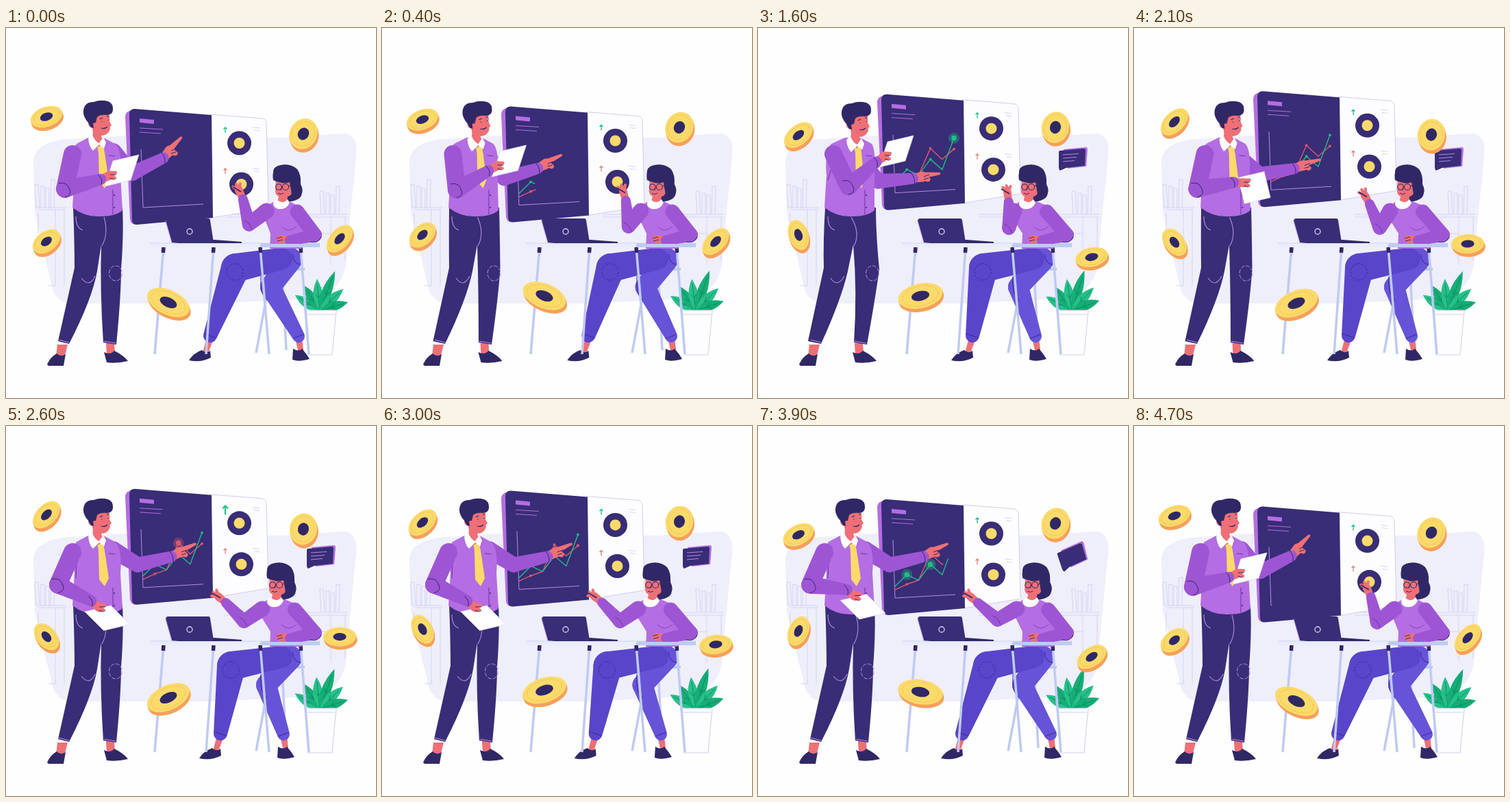
Write an HTML page with a canvas that moves like this. It is 540 px wide and 540 px high and loops after 4800 ms.

```html
<!DOCTYPE html>
<html lang="en">
<head>
<meta charset="utf-8">
<title>Market presentation</title>
<style>
  html, body { margin: 0; width: 100%; height: 100%; overflow: hidden; background: #fefdff; }
  canvas { display: block; width: 100vw; height: 100vh; }
</style>
</head>
<body>
<canvas id="stage" width="540" height="540"></canvas>
<script>
const ctx = document.getElementById('stage').getContext('2d');
const LOOP = 4800, STEP = 100, TAU = Math.PI * 2, DEG = Math.PI / 180;

const NAVY = '#382d76', HAIR = '#302866', VIOLET = '#b46de2', SLEEVE = '#9e55d4',
  SKIN = '#ee7076', RED = '#d9596f', GREEN = '#22bd82', YELLOW = '#fbda6a',
  ORANGE = '#f6a05a', WHITE = '#ffffff', PALE = '#d3d4f2', STEEL = '#bfcaf3',
  SEAM = '#b58ae8', FOLD = '#6b32a0', JEANS = '#5945c9', JEANS_FAR = '#6653d8';

// ---- timing ----
const clamp = v => Math.max(0, Math.min(1, v));
const ramp = (t, from, to) => clamp((t - from) / (to - from));
const ease = (t, from, to) => { const p = ramp(t, from, to); return p * p * (3 - 2 * p); };
const hold = (t, a, b, c, d) => ease(t, a, b) - ease(t, c, d);
const wave = (t, period, peak = 0) => Math.cos(TAU * (t - peak) / period);
const pulse = (t, at) => hold(t, at - 450, at, at, at + 450);

const mix = (a, b, p) => a + (b - a) * p;
const mixPoint = (a, b, p) => a.map((v, i) => mix(v, b[i], p));
const polar = ([x, y], angle, r) => [x + r * Math.cos(angle), y + r * Math.sin(angle)];

// ---- drawing helpers ----
function fill(color, d) {
  ctx.fillStyle = color;
  ctx.fill(new Path2D(d));
}

function line(color, width, d) {
  ctx.strokeStyle = color;
  ctx.lineWidth = width;
  ctx.stroke(new Path2D(d));
}

function dashed(pattern, draw) {
  ctx.setLineDash(pattern);
  draw();
  ctx.setLineDash([]);
}

function oval(color, x, y, rx, ry = rx, angle = 0) {
  ctx.beginPath();
  ctx.ellipse(x, y, rx, ry, angle, 0, TAU);
  ctx.fillStyle = color;
  ctx.fill();
}

function ring(color, width, x, y, rx, ry = rx, angle = 0) {
  ctx.beginPath();
  ctx.ellipse(x, y, rx, ry, angle, 0, TAU);
  ctx.strokeStyle = color;
  ctx.lineWidth = width;
  ctx.stroke();
}

// Rounded segment whose radius goes from r1 to r2.
function taper(color, [x1, y1], r1, [x2, y2], r2) {
  const a = Math.atan2(y2 - y1, x2 - x1);
  const b = Math.acos(Math.max(-1, Math.min(1, (r1 - r2) / Math.hypot(x2 - x1, y2 - y1))));
  ctx.beginPath();
  ctx.arc(x1, y1, r1, a + b, a - b + TAU);
  ctx.arc(x2, y2, r2, a - b, a + b);
  ctx.fillStyle = color;
  ctx.fill();
}

function limb(color, a, r1, b, r2, c, r3) {
  taper(color, a, r1, b, r2);
  taper(color, b, r2, c, r3);
}

// Middle joint of a two-bone limb.
function joint([x1, y1], [x2, y2], upper, lower, side) {
  const dx = x2 - x1, dy = y2 - y1, dist = Math.hypot(dx, dy);
  const along = (upper ** 2 - lower ** 2 + dist ** 2) / (2 * dist);
  const off = side * Math.sqrt(Math.max(0, upper ** 2 - along ** 2));
  return [x1 + (dx * along - dy * off) / dist, y1 + (dy * along + dx * off) / dist];
}

function group(x, y, angle, scale, draw) {
  ctx.save();
  ctx.translate(x, y);
  ctx.rotate(angle);
  ctx.scale(scale, scale);
  draw();
  ctx.restore();
}

function trace(color, width, points, progress) {
  if (progress <= 0) return;
  let length = 0;
  points.forEach(([x, y], i) => {
    if (i) length += Math.hypot(x - points[i - 1][0], y - points[i - 1][1]);
  });
  dashed([length * progress, length * 2], () => line(color, width, 'M' + points.join('L')));
}

// ---- room ----
function books(x, base) {
  for (let i = 0; i < 4; i++) {
    const h = 28 + (i * 13 + 6) % 16, lean = i % 3 ? 0 : i - 2;
    line(PALE, 1, `M${x + i * 7},${base}l${lean},${-h}h5l${-lean},${h}`);
  }
}

function room() {
  ctx.fillStyle = '#fefdff';
  ctx.fillRect(0, 0, 540, 540);
  fill('#efeefb', 'M40,195Q40,170 82,163L175,157L400,160L495,154Q514,158 511,185L497,330Q497,388 440,395L300,402L92,402Q70,398 66,372L42,270Z');
  line(PALE, 1, 'M44,262H88M47,265H88M72,265V376M85,265V376M62,376H72M47,270V300');
  line(PALE, 1, 'M322,272H498M322,276H498M495,276V340M474,276V345M445,300H474');
  books(44, 262);
  books(460, 272);
}

// ---- board ----
const SERIES = [ // beats belong to every second point
  { color: RED, heights: [250, 242, 236, 197, 213, 198], beats: [800, 2600, 3400] },
  { color: GREEN, heights: [245, 228, 236, 213, 228, 182], beats: [3900, 3900, 1600] }];

function chart(t) {
  const axis = t < 4550 ? 1 - ramp(t, 4300, 4500) : ramp(t, 4600, 4800);
  trace(SEAM, 1, [[197, 177], [200, 262], [288, 257]], axis);
  const shown = ramp(t, 250, 950) - ramp(t, 3800, 4400);
  for (const { color, heights, beats } of SERIES) {
    const points = heights.map((y, i) => [200 + 17.2 * i, y]);
    trace(color, 1.4, points, shown);
    beats.forEach((at, i) => {
      const [x, y] = points[2 * i + 1], beat = pulse(t, at);
      if (shown < (2 * i + 1) / 5 - .1) return;
      ctx.globalAlpha = .35;
      oval(color, x, y, 2 + 6 * beat);
      ctx.globalAlpha = 1;
      oval(color, x, y, 1.8 + 2 * beat);
    });
  }
}

function coinRow(x, y, arrowColor, beat) {
  group(320, y - 19, 0, 1 + .6 * beat, () => line(arrowColor, 1.3, 'M0,4V-4M-2.5,-1.5L0,-4L2.5,-1.5'));
  oval(NAVY, x, y, 17.5);
  oval(YELLOW, x, y, 8);
  line(PALE, 1, `M360,${y - 23}l10,1M362,${y - 19}l8,1`);
}

function board(t) {
  ctx.save();
  ctx.translate(0, -26.5 * Math.sin(Math.PI * t / LOOP) ** 1.5);
  fill(VIOLET, 'M188,118L180,121Q174,123 174,130L181,279Q182,287 190,287Z');
  const panel = 'M298,126L374,132Q380,133 380,140L383,261Q383,264 378,264L300,277';
  fill('#fdfcff', panel);
  line('#cfcdf0', 1, panel);
  fill(NAVY, 'M188,118L300,127L302,277L191,287Q184,287 184,280L180,126Q180,118 188,118Z');
  fill(VIOLET, 'M195,132L216,134V140L195,138Z');
  line(VIOLET, 1, 'M195,146L229,148M195,152L226,154');
  chart(t);
  coinRow(340.5, 168, GREEN, pulse(t, 2600));
  coinRow(343.5, 228, '#e08375', pulse(t, 3400));
  ctx.restore();
}

function bubble(t) {
  const size = hold(t, 500, 750, 3900, 4200);
  if (!size) return;
  group(458, 191, -.32 * ramp(t, 3550, 3900), size, () => {
    fill(VIOLET, 'M-12,-14L20,-17Q23,-17 23,-14L21,11L-6,14Z');
    fill(NAVY, 'M-17,-12L17,-15Q20,-15 20,-12L19,10L-8,13L-17,17Q-19,16 -19,12L-19,-10Q-19,-12 -17,-12Z');
    const words = ramp(t, 650, 1300) - ramp(t, 3500, 3800);
    for (let i = 0; i < 3; i++) {
      const y = 5 * i - 6, w = 23 - 3 * i;
      trace(SEAM, 1, [[-13, y], [w - 13, y - 1.5]], clamp(words * 3 - i));
    }
  });
}

// ---- coins ----
const COINS = [
  { x: 59, y: 147, rx: 24, ry: 14.5, rise: -16, tilt: -32, swing: 13 },
  { x: 434, y: 147, rx: 20, ry: 23, rise: 11, tilt: 20, swing: 10 },
  { x: 59, y: 304, rx: 14.5, ry: 22.5, rise: 11, tilt: 6, swing: 48 },
  { x: 237, y: 393, rx: 33, ry: 18, rise: 11, tilt: 0, swing: 25 },
  { x: 487, y: 325, rx: 24, ry: 14, rise: -16, tilt: -24, swing: -24 }];

function coin({ x, y, rx, ry, rise, tilt, swing }, t) {
  y += rise * wave(t, LOOP / 2, rise < 0 ? 100 : -200) - 2;
  const angle = (tilt + swing * wave(t, LOOP)) * DEG;
  for (let d = 5; d > 0; d--) oval(ORANGE, x + d * .35, y + d, rx, ry, angle);
  oval(YELLOW, x, y, rx, ry, angle);
  dashed([1.5, 1.5], () => ring('#e9b64e', 1, x, y, rx * .8, ry * .8, angle));
  oval(HAIR, x, y, rx * .4, ry * .4, angle);
}

// ---- plant ----
function plant(t) {
  const sway = -2 + 3 * wave(t, LOOP / 2, -100);
  for (let i = 0; i < 6; i++) {
    const deg = -58 + 26 * i, n = 43 + 19 * Math.max(0, wave(deg, 120, 20));
    group(458, 413, (deg + sway) * DEG, 1, () => {
      fill(i % 2 ? '#16ad76' : '#27c08a', `M0,0Q-15,${-n * .45} 0,${-n}Q13,${-n * .45} 0,0Z`);
      line('#0b8b61', .9, `M0,0V${-n * .85}M0,${-n * .4}l4,-6M0,${-n * .4}l-4,-6`);
    });
  }
  const pot = 'M436,412H482L476,477H441Z';
  fill('#fdfcff', pot);
  line(PALE, 1.2, pot + 'M438,418H480');
}

// ---- desk ----
function stool() {
  line(STEEL, 4, 'M384,352H436');
  line(STEEL, 3.5, 'M387,356L365,474M403,356L409,470');
}

function desk() {
  for (const [x, foot] of [[230, 217], [303, 292], [371, 384], [430, 442]]) {
    line(STEEL, 3.5, `M${x},320L${foot},476`);
    line(HAIR, 5.5, `M${x},320L${mix(x, foot, .05)},328`);
  }
  fill('#e9ecfc', 'M210,313H458V320H212Z');
  fill(STEEL, 'M372,314H458V320H370Z');
  line(PALE, 1, 'M210,314H458');
  fill(HAIR, 'M303,309L344,312V314H240Z');
  fill(NAVY, 'M237,278H295Q298,278 298,281L303,313H242L233,282Q233,278 237,278Z');
  line(SEAM, .8, 'M233,281L242,313');
  ring('#d9d2f5', 1.3, 268, 297, 4);
}

// ---- woman ----
function womanLegs(t) {
  const step = hold(t, 0, 1300, 2800, 3900);
  const a = 298 + 15 * step, b = 427 - 22 * step;
  const knee = [335 - 6 * step, 350], farKnee = [386 - 6 * step, 378];
  taper(SKIN, [a, 452], 5, [a - 6, 471], 4);
  taper(SKIN, [b, 452], 5, [b + 3, 470], 4);
  fill(HAIR, `M${a - 31},485Q${a - 24},474 ${a - 12},470Q${a - 6},476 ${a},471L${a + 1},481Q${a - 14},489 ${a - 31},485Z`);
  fill(HAIR, `M${b - 8},468Q${b},473 ${b + 5},468Q${b + 12},476 ${b + 16},483Q${b},488 ${b - 9},484Z`);
  limb(JEANS_FAR, [414, 338], 18, farKnee, 15, [b, 450], 9);
  limb(JEANS, [402, 337], 16, knee, 21, [a, 449], 10);
  dashed([3, 2], () => ring('#392b96', 1, knee[0] - 1, 356, 12));
  line('#392b96', 1, `M${a - 9},446L${a + 8},452M${b - 8},453L${b + 8},447M372,362Q370,390 381,397M418,330Q420,345 430,345`);
}

function womanHead() {
  fill(HAIR, 'M393,222Q384,203 401,200Q415,197 425,206Q431,214 430,228Q434,236 432,241Q431,249 421,252Q412,255 406,250L398,240Z');
  fill(SKIN, 'M394,222Q408,224 415,217L419,234Q417,246 411,246L410,256Q402,261 396,254L398,246Q392,243 393,236Z');
  fill(WHITE, 'M390,256Q391,251 396,251Q404,258 411,250L414,255Q409,266 397,264Q390,262 390,256Z');
  fill(HAIR, 'M390,222Q387,203 401,202Q417,202 419,222Q421,235 417,243L414,225Q406,229 390,222Z');
  ring(HAIR, 1.1, 398, 232, 4.3);
  ring(HAIR, 1.1, 408, 232, 4.5);
  line(HAIR, 1, 'M412,231L418,229M402,233L401,237M397,241Q401,244 405,241');
}

function womanBody(t) {
  const lean = -9 * hold(t, 0, 1000, 3400, 4300);
  const think = hold(t, 0, 800, 1600, 2600), explain = hold(t, 1600, 2600, 3900, 4700);
  const lift = pulse(t, 3400);

  fill(VIOLET, `M${390 + lean},254Q${376 + lean * .7},260 ${378 + lean * .5},280L386,300L385,322H432L434,295Q441,268 ${425 + lean * .4},259L${408 + lean},250Z`);
  line('#8846bd', 1, 'M402,290Q412,300 424,290');

  const rest = [414, 310 - 16 * lift];
  const [fx, fy] = rest;
  taper(SKIN, rest, 6, [fx - 14, fy - 2], 5.5);
  line(HAIR, 1, `M${fx - 19},${fy - 3}l8,-2M${fx - 18},${fy + 1}l8,-2`);
  limb(SLEEVE, [425 + lean * .4, 268], 10.5, [451, 302], 10, rest, 7);
  line(HAIR, 1, 'M444,312Q456,315 460,305');

  const hand = [340 + 24 * think - 30 * explain + 9 * lift, 237 + 3 * think + 12 * explain - 7 * lift];
  const aim = -2 + .3 * think - .45 * explain;
  const wrist = polar(hand, aim, -14), shoulder = [380 + lean * .7, 267];
  const elbow = joint(shoulder, wrist, 32 - 6 * think, 38, -1);
  taper(SKIN, wrist, 5, hand, 6);
  for (const spread of [-.6, 0, .6]) taper(SKIN, hand, 3, polar(hand, aim + spread, 10), 2);
  line(HAIR, 1.6, `M${hand[0] - 9},${hand[1] - 5}l12,7`);
  limb(SLEEVE, shoulder, 11.5, elbow, 10, wrist, 7);
  line(FOLD, 1, `M${elbow[0] - 7},${elbow[1] - 6}q9,4 11,13`);

  group(lean, 0, 0, 1, womanHead);
}

// ---- man ----
function manLegs(turn) {
  const by = (a, b) => mix(a, b, turn);
  fill(SKIN, 'M75,462L90,462L85,482L73,480Z');
  fill(HAIR, 'M60,491Q65,480 74,475Q79,481 87,476L84,493H62Z');
  group(-5 * turn, 0, 0, 1, () => {
    fill(SKIN, 'M146,460H158L159,476L147,478Z');
    fill(HAIR, 'M143,473Q152,478 158,471Q172,478 178,486Q162,490 147,488Z');
  });
  fill('#2b245f', `M138,300L${by(142, 150)},350L148,395L158,330Z`);
  fill(NAVY, `M98,262Q${by(100, 95)},310 ${by(100, 96)},350L${by(76, 73)},457L92,461` +
    `Q${by(126, 122)},395 ${by(133, 131)},355L139,316Q${by(137, 145)},385 ${by(142, 140)},459L${by(161, 159)},462` +
    `Q${by(168, 172)},390 ${by(168, 177)},352Q172,300 ${by(170, 172)},262Z`);
  line(SEAM, 1.1, `M77,455L92,459M${by(143, 140)},457L${by(160, 158)},460M102,275Q102,292 112,295` +
    `M${by(143, 136)},276Q150,300 140,318M${by(110, 106)},365Q${by(122, 116)},380 ${by(130, 126)},362`);
  dashed([6, 2], () => ring(SEAM, 1, by(160, 167), 358, 9.5, 11));
}

function manTorso(turn) {
  const up = 7 * turn;
  fill(VIOLET, `M${120 + up},160L${103 + up * .6},169Q${94 + up * .4},180 100,215L97,262Q115,276 137,275Q160,275 170,266L${167 + turn * 3},215` +
    `Q${170 + up * .3},178 ${159 + up},169L${144 + up},161Z`);
  line(FOLD, 1, `M${103 + up},196L102,222M${150 + up},186l9,1M156,236V272`);
  for (const y of [244, 262]) oval(HAIR, 158, y, 1);
  fill(YELLOW, `M${133 + up},172h9l2,10L${150 + up * .7},222L${144 + up},234L${136 + up},224L${135 + up},182Z`);
}

function manHead() {
  fill(SKIN, 'M125,140L150,130L152,148Q148,157 139,157L142,167L134,174L125,164L127,153Z');
  fill(WHITE, 'M120,161L126,156Q130,166 136,168L142,159L146,167L143,176L136,170L127,179Q121,173 120,161Z');
  fill(SKIN, 'M122,133Q130,132 135,127L150,123Q152,131 151,136L154,142L151,145Q151,155 142,156Q130,155 128,146Q120,146 120,139Z');
  fill(HAIR, 'M120,138Q112,129 113,121Q114,108 128,108Q138,104 149,107Q157,110 156,120Q155,127 147,127Q138,126 133,130L131,138L127,139L128,146L124,145Z');
  line(HAIR, 1.2, 'M137,133L141,131M147,129L150,129M140,136v1M149,134v1M139,146Q144,148 148,144M122,141Q125,139 126,143');
}

function pointingArm(turn, low) {
  const hand = [239 + turn + 15 * low, 179 + 38 * turn + 5 * low];
  const aim = -.85 + .67 * turn + .36 * low;
  const wrist = polar(hand, aim, -14), shoulder = [156 + 4 * turn, 181 + 27 * turn];
  const elbow = joint(shoulder, wrist, 42 - 20 * turn, 51, 1);
  const [hx, hy] = hand, [wx, wy] = wrist;
  taper(SKIN, wrist, 6, hand, 7.5);
  taper(SKIN, [hx, hy - 2], 4.5, polar(hand, aim, 25), 1.8);
  taper(SKIN, hand, 5, [hx + 8, hy + 4], 3.5);
  line(HAIR, 1, `M${hx + 2},${hy}l8,-3M${hx + 2},${hy + 4}l7,-2`);
  limb(SLEEVE, shoulder, 13, elbow, 11, wrist, 8);
  line(HAIR, 1, `M${wx - 3},${wy - 8}q7,8 5,16`);
}

function paperArm(turn, low, flat) {
  const hand = [152 + 33 * turn - 16 * low, 215 - 28 * turn + 50 * low];
  const [hx, hy] = hand;

  const corner = mixPoint([hx + 4, hy - 21], [hx - 21, hy + 6], flat);
  const side = polar([0, 0], mix(108, 45, flat) * DEG, 39);
  const paper = `M${corner}l38,-9l${side}l-38,9Z`;
  fill(WHITE, paper);
  line('#dcdaf4', .8, paper);

  const wrist = polar(hand, mix(-.4, .7, flat) - .2 * turn, -15), shoulder = [97 + 13 * turn, 184];
  const elbow = joint(shoulder, wrist, 52, 54, 1);
  const [ex, ey] = elbow, [wx, wy] = wrist;
  taper(SKIN, wrist, 6, hand, 6.5);
  taper(SKIN, [hx - 2, hy - 3], 3.5, [hx + 8, hy - 4], 2.2);
  taper(SKIN, [hx, hy + 2], 3.5, [hx + 7, hy + 4], 2.2);
  line(HAIR, 1, `M${hx},${hy - 1}h9M${hx},${hy + 4}l6,2`);
  limb(SLEEVE, shoulder, 13, elbow, 13, wrist, 8);
  line(HAIR, 1, `M${ex - 9},${ey - 8}q13,-4 17,12q0,6 -8,8M${wx - 4},${wy - 7}q8,7 5,15`);
}

function man(t) {
  const turn = hold(t, 0, 800, 1600, 2600);
  const low = hold(t, 1600, 2600, 3900, 4700);
  manLegs(turn);
  pointingArm(turn, low);
  manTorso(turn);
  group(9 * turn, 2 * turn, 0, 1, manHead);
  paperArm(turn, hold(t, 1600, 2600, 3400, 4700), low);
}

function draw(t) {
  room();
  board(t);
  bubble(t);
  plant(t);
  stool();
  womanLegs(t);
  desk();
  womanBody(t);
  line(STEEL, 5, 'M372,317.5H456');
  man(t);
  for (const c of COINS) coin(c, t);
}

ctx.lineJoin = 'round';
const start = performance.now();
function frame() {
  const t = (performance.now() - start) % LOOP;
  draw(Math.floor(t / STEP) * STEP);
  requestAnimationFrame(frame);
}
frame();
</script>
</body>
</html>
```
